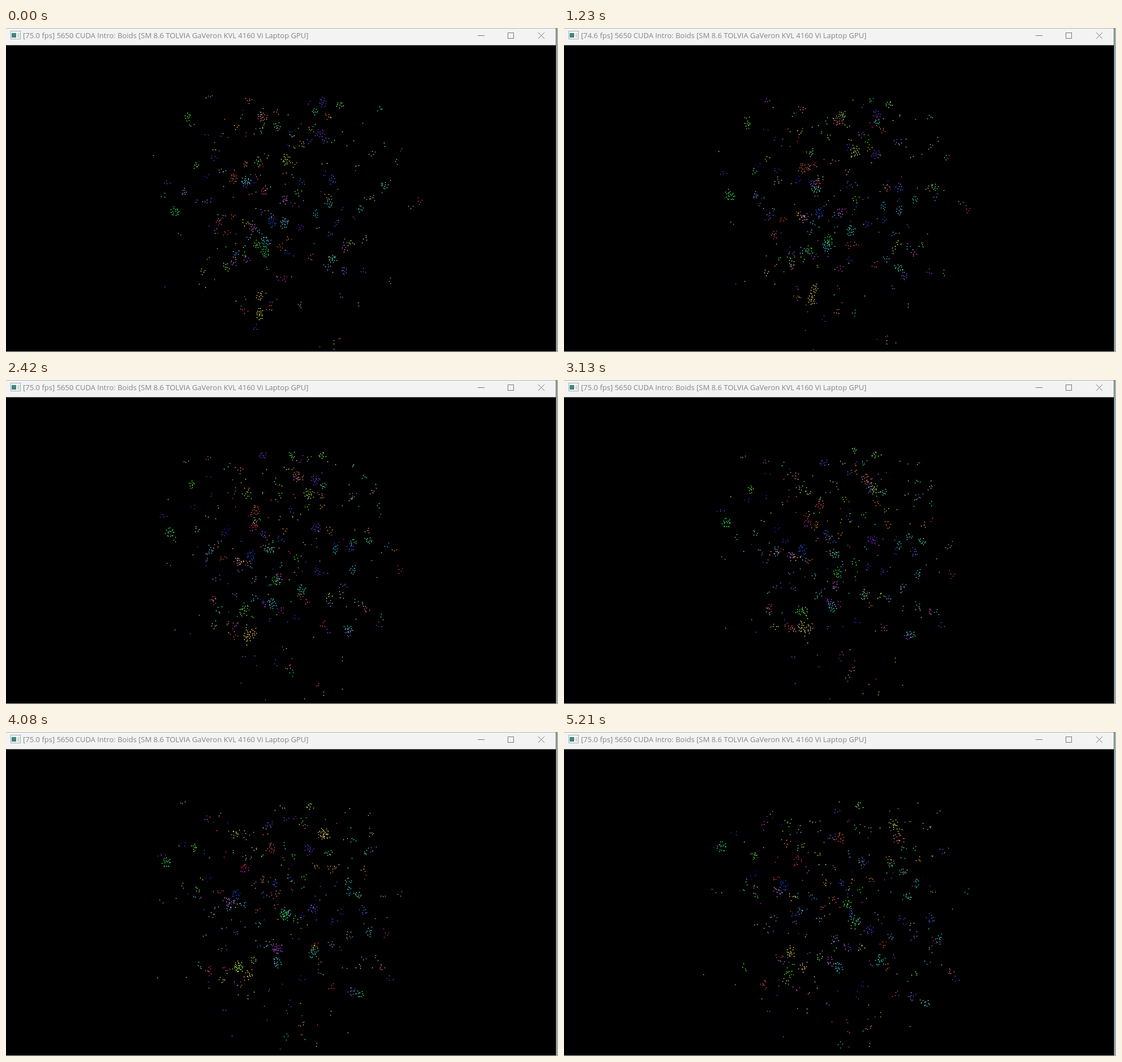
Animation, 976 px wide and 574 px high, one loop 5230 ms. Source, as an HTML page with a canvas:

```html
<!DOCTYPE html>
<html lang="en">
<head>
<meta charset="utf-8">
<title>Boids</title>
<style>
html, body { margin: 0; width: 100%; height: 100%; overflow: hidden; background: #000; }
#stage { position: relative; width: 976px; height: 574px; overflow: hidden; }
canvas, svg { position: absolute; left: 0; top: 0; }
#title {
  position: absolute; left: 30px; top: 0; white-space: pre;
  font: 13px/26px "Open Sans", "Noto Sans", sans-serif; color: #858585;
}
</style>
</head>
<body>
<div id="stage">
  <canvas id="view" width="976" height="574"></canvas>
  <svg width="976" height="574">
    <rect width="973" height="30.5" fill="#f3f3f3"/>
    <rect width="973" height="1" fill="#b4b4b4"/>
    <rect x="972" width="1" height="574" fill="#5c6060"/>
    <rect x="973" width="3" height="574" fill="#a4acac"/>
    <rect y="573" width="973" height="1" fill="#b8bcbc"/>
    <rect x="8.5" y="5.5" width="17" height="14" fill="#fafafa" stroke="#a2a8ac"/>
    <rect x="10" y="9" width="8" height="8" fill="#3f8583"/>
    <rect x="20" y="9" width="4" height="8" fill="#d5d9dc"/>
    <g fill="none" stroke="#777">
      <path d="M834 13.5h12M941 8l11 11M952 8l-11 11"/>
      <rect x="887.5" y="8.5" width="10" height="10"/>
    </g>
  </svg>
  <div id="title"></div>
</div>
<script>
const LOOP = 5230, END = 5210, STEPS = 88;
const TOP = 118, BOTTOM = 572;
const GOLDEN = 2.39996;
const RATES = ["75.0", "74.6", "75.3"];

// The largest flocks: start x, y, travel x, y, hue
const LEADERS = [
  [560, 131, -31, 99, 258],
  [452, 157, 139, 31, 4],
  [494, 233, 88, -69, 78],
  [555, 186, -16, 164, 264],
  [424, 270, 91, 63, 164],
  [458, 378, 26, 38, 186],
  [298, 325, -20, -122, 140],
  [448, 506, -48, -117, 58],
  [458, 396, 44, -93, 132],
  [491, 345, 66, 60, 174],
  [402, 265, 86, -78, 10],
  [470, 343, -84, -71, 222]
];

let seed = 5650;
function rand() {
  seed = (seed + 0x6d2b79f5) | 0;
  let n = Math.imul(seed ^ (seed >>> 15), 1 | seed);
  n = (n + Math.imul(n ^ (n >>> 7), 61 | n)) ^ n;
  return ((n ^ (n >>> 14)) >>> 0) / 4294967296;
}
const spread = size => (rand() * 2 - 1) * size;

const dots = [];

function addFlock(x, y, vx, vy, hue, count, gap) {
  const tilt = rand() * Math.PI, wide = 0.8 + rand() * 0.3;
  const sat = 65 + rand() * 35, light = 48 + rand() * 22;
  for (let i = 0; i < count; i++) {
    const a = i * GOLDEN + tilt, r = gap * Math.sqrt(i + 0.4);
    dots.push({
      x: x + Math.cos(a) * r * wide + spread(1.2),
      y: y + Math.sin(a) * r / wide + spread(1.2),
      vx: vx + spread(3), vy: vy + spread(3),
      color: `hsl(${hue + spread(8)},${sat}%,${light + spread(8)}%)`
    });
  }
}

// Seeded groups fill a cube seen from above, thinning towards its lowest corner.
function addGroup(count, gap, lowShare) {
  const low = rand() < lowShare;
  const x = low ? 490 + spread(110) : 484 + spread(145) + spread(70);
  const y = low ? 450 + rand() * 115 : 125 + rand() * 325;
  const a = rand() * Math.PI * 2, reach = 40 + rand() * 70;
  const vx = Math.cos(a) * reach, vy = Math.sin(a) * reach;
  addFlock(x - vx / 2, y - vy / 2, vx, vy, rand() * 360, count, gap);
}

for (const [x, y, vx, vy, hue] of LEADERS) {
  addFlock(x, y, vx, vy, hue, 14 + Math.floor(rand() * 7), 2.1);
}
for (let i = 0; i < 22; i++) addGroup(7 + Math.floor(rand() * 6), 2.2, 0);
for (let i = 0; i < 215; i++) addGroup(1 + Math.floor(rand() ** 2.2 * 6), 2.9, 0.1);

const ctx = document.getElementById("view").getContext("2d");
const title = document.getElementById("title");

function draw(ms) {
  const p = Math.min(STEPS, Math.floor(ms * STEPS / END)) / STEPS;
  ctx.fillStyle = "#000";
  ctx.fillRect(0, 0, 976, 574);
  for (const d of dots) {
    const x = d.x + d.vx * p, y = d.y + d.vy * p;
    if (y < TOP || y > BOTTOM) continue;
    ctx.fillStyle = d.color;
    ctx.fillRect(Math.round(x), Math.round(y), 1.5, 1.5);
  }
  // The rate is read once a second.
  const rate = RATES[Math.floor((p * END + 670) / 1000)] || RATES[0];
  const text = `[${rate} fps] 5650 CUDA Intro: Boids [SM 8.6 TOLVIA GaVeron KVL 4160 Vi Laptop GPU]`;
  if (title.textContent !== text) title.textContent = text;
}

const start = performance.now();
function tick() {
  draw((performance.now() - start) % LOOP);
  requestAnimationFrame(tick);
}
tick();
</script>
</body>
</html>
```
